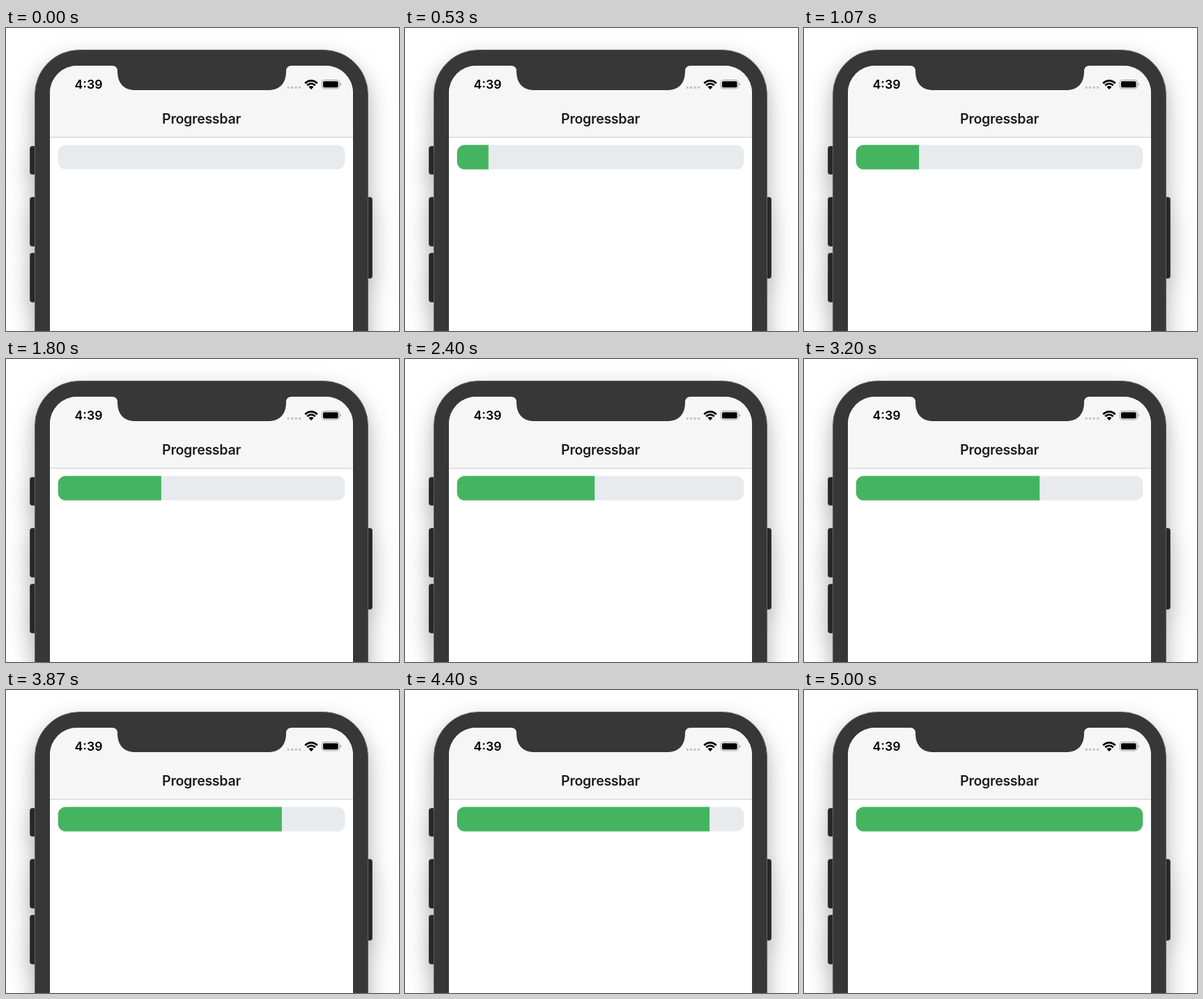
An HTML page that plays this animation: 564x434 px, repeating every 5.14 s.

```html
<!DOCTYPE html>
<html lang="en">
<head>
<meta charset="utf-8">
<title>Progressbar</title>
<style>
  html, body { margin: 0; width: 100%; height: 100%; overflow: hidden; background: #fff; }
  svg { display: block; }
  text { font-family: Inter, "Liberation Sans", sans-serif; font-weight: 600; }
  .shadow { filter: drop-shadow(0 14px 16px rgba(0, 0, 0, .32)); }
  .button { fill: #272727; stroke: #464846; }
</style>
</head>
<body>
<svg width="564" height="434" viewBox="0 0 564 434">
  <defs>
    <clipPath id="screen"><rect x="63" y="54" width="435" height="500" rx="39"/></clipPath>
    <clipPath id="track"><rect x="74.5" y="167.5" width="412" height="35" rx="11.5"/></clipPath>
    <clipPath id="fan"><path d="M438 88 L425 75 V70 H451 V75Z"/></clipPath>
  </defs>

  <g class="shadow">
    <g class="button">
      <rect x="34.5" y="169.5" width="12" height="40" rx="3"/>
      <rect x="34.5" y="242.5" width="12" height="70" rx="3"/>
      <rect x="34.5" y="322.5" width="12" height="70" rx="3"/>
      <rect x="513.5" y="242.5" width="12" height="116" rx="3"/>
    </g>
    <rect x="41.5" y="31.5" width="478" height="700" rx="64" fill="#373737" stroke="#626763"/>
  </g>

  <g clip-path="url(#screen)">
    <path d="M63 54H498V434H63Z" fill="#fff"/>
    <path d="M63 54H498V156H63Z" fill="#f6f6f6"/>
    <path d="M63 156H498V157H63Z" fill="#cfcfcf"/>
    <path d="M148 53V54H152Q160 54 160 62C160 79 169 89 186 89H376C393 89 402 79 402 62Q402 54 410 54H414V53Z" fill="#373737"/>
  </g>

  <text x="118.5" y="87" font-size="17.6" text-anchor="middle">4:39</text>
  <text x="280.5" y="137.4" font-size="19.5" letter-spacing="-.25" text-anchor="middle" fill="#1c1c1e">Progressbar</text>

  <path d="M405.2 85.3H424" stroke="#c2c2c2" stroke-width="3.6" stroke-linecap="round" stroke-dasharray="0 5.5"/>
  <g clip-path="url(#fan)" fill="none" stroke="#000" stroke-width="2.7">
    <circle cx="438" cy="87" r="11.6"/>
    <circle cx="438" cy="87" r="7.4"/>
    <circle cx="438" cy="87" r="2" stroke-width="4"/>
  </g>
  <rect x="453.3" y="74.5" width="25" height="12.4" rx="3.2" fill="none" stroke="#a2a2a2"/>
  <rect x="455" y="76.2" width="21.6" height="9" rx="1.7"/>
  <path d="M479.6 78.6Q481.2 79.2 481.2 80.7T479.6 82.8Z" fill="#a2a2a2"/>

  <g clip-path="url(#track)">
    <path d="M74 167H487V203H74Z" fill="#e8ebee"/>
    <rect id="bar" x="74.5" y="167" width="0" height="36" fill="#45b461"/>
  </g>
</svg>
<script>
  const LOOP = 5140, TICK = 200 / 3, WIDTH = 412;
  const bar = document.getElementById('bar');
  const start = performance.now();

  // One percent per 50 ms, shown at 15 steps a second.
  function draw() {
    const time = (performance.now() - start) % LOOP;
    const step = Math.floor((time + 3.4) / TICK);
    const percent = Math.min(100, Math.ceil(step * 4 / 3));
    bar.setAttribute('width', WIDTH * percent / 100);
    requestAnimationFrame(draw);
  }
  draw();
</script>
</body>
</html>
```
